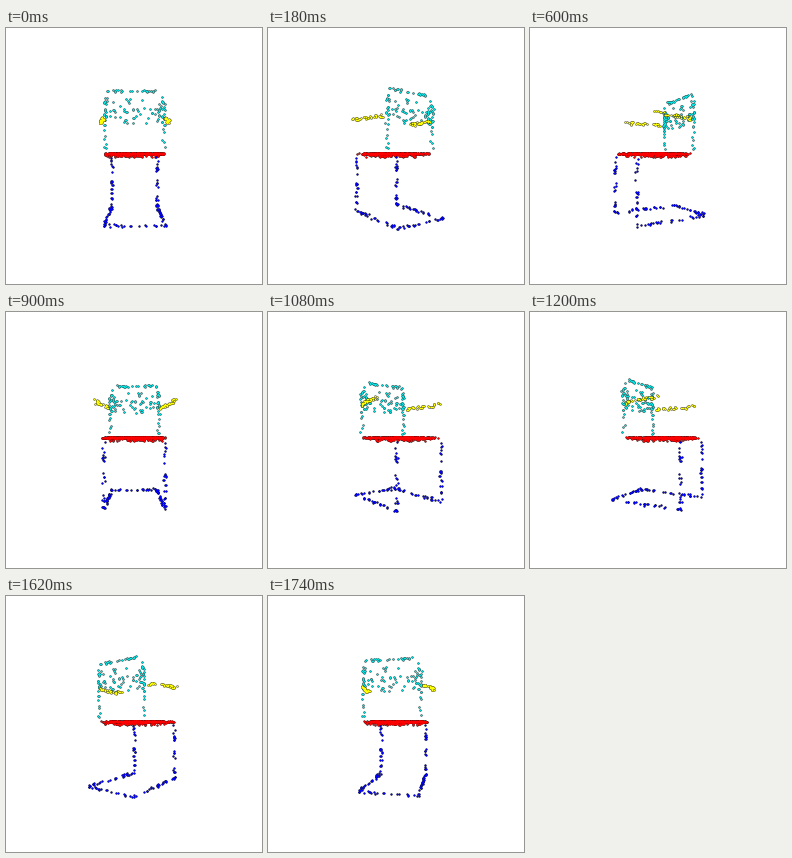
A matplotlib script that plays this animation: 256x256 px, repeating every 1800 ms.

```python
import numpy as np
import matplotlib.pyplot as plt
from matplotlib.animation import FuncAnimation

SIZE, DPI = 256, 100
FRAMES, STEP = 30, 60
CX, HORIZON, CAMERA = 128.2, 126.0, 236.0
FLOOR = -59.8

rng = np.random.default_rng(7)


def tube(points, count, radius=1.2):
    """Scatter points along a polyline of (side, back, up) corners."""
    points = np.array(points, float)
    lengths = np.linalg.norm(np.diff(points, axis=0), axis=1)
    along = np.concatenate([[0], np.cumsum(lengths)])
    at = rng.uniform(0, along[-1], count)
    line = np.column_stack([np.interp(at, along, p) for p in points.T])
    return line + rng.uniform(-radius, radius, (count, 3))


def slab(low, high, count):
    """Scatter points evenly in a box."""
    return rng.uniform(low, high, (count, 3))


def build():
    seat = [slab((-28, -33, -2.8), (28, 21, -1), 60),
            slab((-28.5, -33, -0.4), (28.5, 21, 1.2), 480)]
    back = [tube([(-25, 23, 57), (26, 23, 57)], 24),
            slab((-23, 21, 38), (25, 25, 50), 22),
            slab((-23, 21, 28), (24, 25, 40), 28)]
    arms, frame = [], []
    for side in (-1, 1):
        post = 26.3 * side
        back += [tube([(post, 23, 26), (post, 23, 53)], 20, 1.6),
                 tube([(post, 23, 2), (post, 23, 26)], 6)]
        arms.append(tube([(36 * side, -25, 34.5), (35 * side, -6, 33.5),
                          (28 * side, 20, 33)], 34, 1.5))
        leg = 26 * side
        frame += [tube([(leg, -36, -4), (leg, -36, FLOOR)], 22),
                  tube([(leg, -36, FLOOR), (leg, 38, FLOOR)], 27)]
    frame.append(tube([(-26, 38, FLOOR), (26, 38, FLOOR)], 22))
    parts = ((seat, "#ff0000"), (frame, "#0000ff"),
             (back, "#00e6e6"), (arms, "#ffff00"))
    return [(np.vstack(cloud), color) for cloud, color in parts]


def project(cloud, angle):
    side, back, up = cloud.T
    x = side * np.cos(angle) + back * np.sin(angle)
    near = back * np.cos(angle) - side * np.sin(angle)
    scale = 1 / (1 - near / CAMERA)
    return CX + x * scale, HORIZON - up * scale


def px(size):
    return size * 72 / DPI


fig = plt.figure(figsize=(SIZE / DPI, SIZE / DPI), dpi=DPI, facecolor="white")
ax = fig.add_axes([0, 0, 1, 1])
ax.set(xlim=(0, SIZE), ylim=(SIZE, 0))
ax.axis("off")

chair = []
for cloud, color in build():
    rim, = ax.plot([], [], "o", ms=px(2.4), mew=0, color="black", alpha=0.8)
    dot, = ax.plot([], [], "o", ms=px(1.7), mew=0, color=color)
    chair.append((cloud, rim, dot))


def draw(i):
    angle = 2 * np.pi * i / FRAMES
    for cloud, rim, dot in chair:
        x, y = project(cloud, angle)
        rim.set_data(x, y)
        dot.set_data(x, y)
    return [artist for _, *pair in chair for artist in pair]


anim = FuncAnimation(fig, draw, frames=FRAMES, interval=STEP,
                     repeat=True, repeat_delay=0)
plt.show()
```
